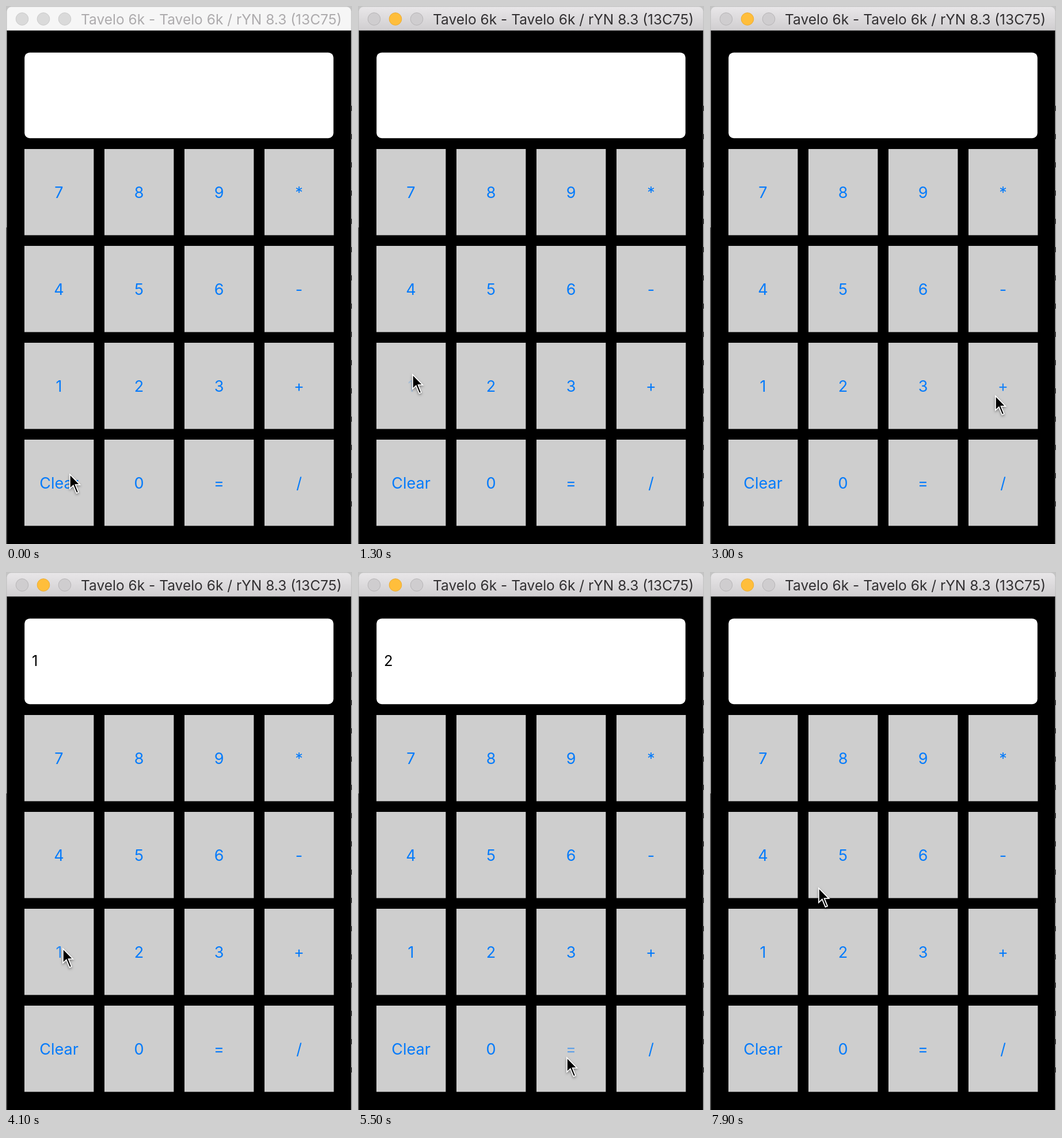
An HTML page with a canvas that plays this animation: 601x933 px, repeating every 8 s.

```html
<!DOCTYPE html>
<html lang="en">
<head>
<meta charset="utf-8">
<title>Calculator</title>
<style>
html, body { margin: 0; width: 100%; height: 100%; overflow: hidden; background: #000; }
canvas { display: block; }
</style>
</head>
<body>
<canvas id="stage" width="601" height="933"></canvas>
<script>
const ctx = document.getElementById('stage').getContext('2d');
const FONT = 'Inter, Roboto, sans-serif';
const LOOP = 8000;
const ACTIVATE = 1000;
const HOLD = 180;
const FADE = 230;
const KEY_W = 120.4;
const KEY_H = 149.4;

const keys = [...'789*456-123+', 'Clear', ...'0=/'].map((name, i) => ({
  name,
  x: 32 + (i % 4) * 139,
  y: 248 + Math.floor(i / 4) * 168
}));

// Pointer stops: offset from a key's centre, arrival, and for taps the release and shown value
const stops = [
  { key: 'Clear', dx: 18, dy: -21, arrive: 0 },
  { key: '1', dx: 2, dy: -26, arrive: 800, up: 1400, shows: '1' },
  { key: '+', dx: -14, dy: 11, arrive: 2450, up: 2800, shows: '' },
  { key: '1', dx: 6, dy: -12, arrive: 3700, up: 3920, shows: '1' },
  { key: '=', dx: -8, dy: 9, arrive: 4900, up: 5400, shows: '2' },
  { key: 'Clear', dx: 34, dy: -32, arrive: 6740 },
  { key: 'Clear', dx: 25, dy: -15, arrive: 7010, up: 7300, shows: '' },
  { key: '5', dx: -43, dy: 51, arrive: 7900 }
].map(stop => {
  const key = keys.find(k => k.name === stop.key);
  return { ...stop, x: key.x + 60 + stop.dx, y: key.y + 79 + stop.dy };
});
const taps = stops.filter(stop => stop.up);

function box(x, y, w, h, r, fill) {
  ctx.beginPath();
  ctx.roundRect(x, y, w, h, r);
  ctx.fillStyle = fill;
  ctx.fill();
}

function label(str, x, y, size, color, align = 'left') {
  ctx.font = `${size}px ${FONT}`;
  ctx.textAlign = align;
  ctx.fillStyle = color;
  ctx.fillText(str, x, y);
}

// Longer moves take longer; each move ends at the stop's arrival time
function pointerAt(t) {
  const next = stops.findIndex(stop => stop.arrive > t);
  if (next < 0) return stops[stops.length - 1];
  const a = stops[next - 1];
  const b = stops[next];
  const travel = 250 + 0.8 * Math.hypot(b.x - a.x, b.y - a.y);
  const u = Math.max(0, 1 - (b.arrive - t) / travel);
  const e = u * u * (3 - 2 * u);
  return { x: a.x + (b.x - a.x) * e, y: a.y + (b.y - a.y) * e };
}

function keyAlpha(name, t) {
  const tap = taps.find(s => s.key === name && t >= s.up - HOLD && t < s.up + FADE);
  return tap ? 0.2 + 0.8 * Math.max(0, t - tap.up) / FADE : 1;
}

function displayAt(t) {
  const done = taps.filter(tap => t >= tap.up);
  return done.length ? done[done.length - 1].shows : '';
}

function drawFrameEdges() {
  box(0, 0, 601, 933, 0, '#c4c4c4');
  box(0, 384, 2, 549, 0, '#6e6e6e');
  for (let y = 177; y < 900; y += 49) box(600, y - 4, 1, 9, 0, '#222');
  box(1.5, 42, 598, 891, 0, '#000');
}

function drawTitle(active) {
  let fill = '#f6f6f6';
  if (active) {
    fill = ctx.createLinearGradient(0, 1, 0, 42);
    fill.addColorStop(0, '#e9e7e9');
    fill.addColorStop(1, '#d0ced0');
  }
  box(1.5, 1.5, 598, 41, [8, 8, 0, 0], fill);
  for (let i = 0; i < 3; i++) {
    const lit = active && i === 1;
    ctx.beginPath();
    ctx.arc(28 + i * 37, 22.5, 10.8, 0, Math.PI * 2);
    ctx.fillStyle = lit ? '#ffbe3b' : active ? '#cfcdcf' : '#dadada';
    ctx.fill();
    ctx.lineWidth = 1;
    ctx.strokeStyle = lit ? '#ebac35' : active ? '#b7b5b7' : '#cbcbcb';
    ctx.stroke();
  }
  label('Tavelo 6k - Tavelo 6k / rYN 8.3 (13C75)', 130, 31.5, 24.5, active ? '#323032' : '#adabad');
}

function drawKeys(t) {
  for (const { name, x, y } of keys) {
    box(x, y, KEY_W, KEY_H, 0, '#cecece');
    ctx.globalAlpha = keyAlpha(name, t);
    label(name, x + 60, y + 85, 27, '#047bfb', 'center');
    ctx.globalAlpha = 1;
  }
}

function drawPointer({ x, y }) {
  const arrow = new Path2D('M0 0V29L6.5 23L12 36L17 33.8L11.8 21H20.5Z');
  ctx.save();
  ctx.translate(x, y);
  ctx.shadowColor = 'rgba(0,0,0,0.4)';
  ctx.shadowBlur = 4;
  ctx.shadowOffsetY = 2;
  ctx.fillStyle = '#fff';
  ctx.fill(arrow);
  ctx.shadowColor = 'transparent';
  ctx.clip(arrow);
  ctx.fillStyle = '#000';
  ctx.fill(arrow);
  ctx.lineWidth = 3.4;
  ctx.strokeStyle = '#fff';
  ctx.stroke(arrow);
  ctx.restore();
}

function draw(t) {
  drawFrameEdges();
  drawTitle(t >= ACTIVATE);
  box(32.2, 80.7, 536.6, 148.5, 9, '#fff');
  label(displayAt(t), 45, 163, 25.5, '#000');
  drawKeys(t);
  drawPointer(pointerAt(t));
}

const start = performance.now();
function tick(now) {
  draw(Math.max(0, now - start) % LOOP);
  requestAnimationFrame(tick);
}
draw(0);
requestAnimationFrame(tick);
</script>
</body>
</html>
```
